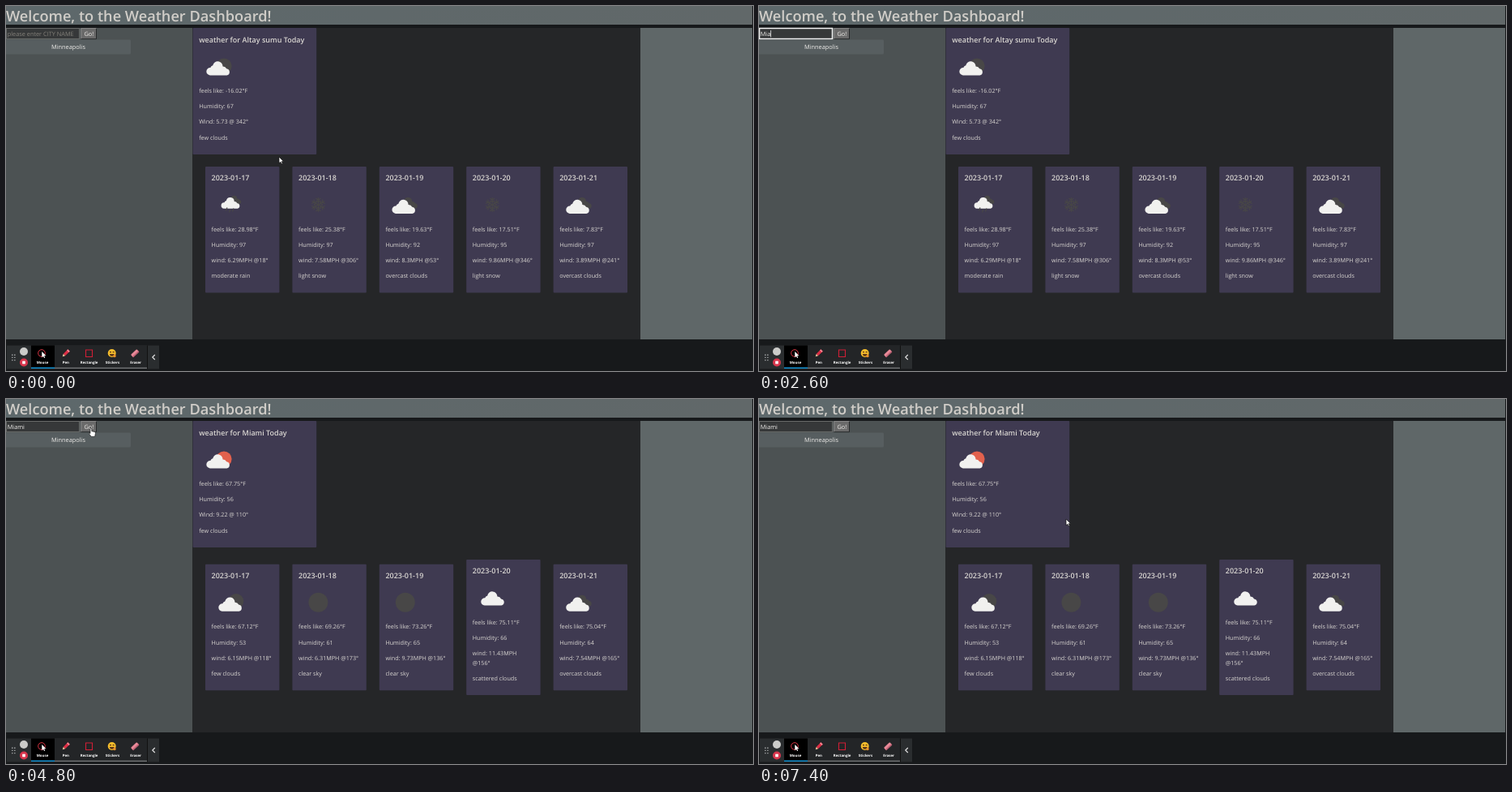
Write an HTML page that moves like this. It is 922 by 450 pixels and loops after 7.46 s.

```html
<!DOCTYPE html>
<html lang="en">
<head>
<meta charset="utf-8">
<title>Weather Dashboard</title>
<style>
html, body { margin: 0; width: 100%; height: 100%; overflow: hidden; background: #17191b; }
svg { display: block; width: 922px; height: 450px; }
text { font-family: "Open Sans", "Noto Sans", sans-serif; font-size: 7.2px; fill: #d8d5d1; text-rendering: geometricPrecision; }
.title { font-size: 18.2px; font-weight: 600; fill: #d0cdc8; }
.head { font-size: 9px; font-weight: 600; }
.form { font-size: 7.35px; fill: #efedea; }
.tool { font-size: 4.4px; font-weight: 700; fill: #fff; text-anchor: middle; }
.mid { text-anchor: middle; }
</style>
</head>
<body>
<svg viewBox="0 0 922 450">
  <defs>
    <linearGradient id="bar"><stop stop-color="#5d686b"/><stop offset="1" stop-color="#616869"/></linearGradient>
    <path id="cloud" d="M4.800 18.400A4.700 4.700 0 0 1 5.300 9A4.200 4.200 0 0 1 8.300 6.200A6.150 6.150 0 0 1 20.500 7.400A5 5 0 0 1 25.200 10.200A4.150 4.150 0 0 1 25.500 18.400Z"/>
  </defs>
  <path fill="url(#bar)" d="M0 0h921v23h-921z"/>
  <path fill="#4c5253" d="M0 27h230v384h-230z"/>
  <path fill="#252628" d="M230 27h553v384h-553z"/>
  <path fill="#5f6768" d="M783 27h138v384h-138z"/>
  <text class="title" x="0" y="19">Welcome, to the Weather Dashboard!</text>

  <rect id="field" x=".5" y="27.5" width="90" height="13" fill="#363839"/>
  <text id="entry" class="form" x="1.7" y="36.9"></text>
  <path id="caret" stroke="#fff" stroke-width=".7"/>
  <path fill="#6a6a6a" d="M92.5 27.5h19v13h-19z"/>
  <path fill="none" stroke="#858585" d="M92.7 40.5v-13h19"/>
  <path fill="none" stroke="#27292a" d="M92.5 40.7h19v-13"/>
  <text class="form mid" x="102.3" y="36.9">Go!</text>
  <rect x="-4" y="41.5" width="158" height="18" rx="1.5" fill="#575e60"/>
  <text class="form mid" x="77" y="53.2">Minneapolis</text>

  <g id="before"></g>
  <g id="after"></g>

  <g id="toolbar">
    <path fill="#2a2d2f" d="M1 418.500h188v29h-188z"/>
    <path fill="#232527" d="M60 418.500h114v28h-114z"/>
    <path fill="#000" d="M31 418.500h29v28h-29z"/>
    <path fill="#1593d2" d="M31 445.500h29v1.500h-29z"/>
    <path fill="#77797b" d="M60 445.700h114v1.200h-114z"/>
    <path stroke="#a5a7a8" stroke-width="1.400" stroke-dasharray="1.400 1.800" d="M7.800 429.500v8M10.800 429.500v8"/>
    <circle cx="22" cy="426" r="5" fill="#cbcbc9"/>
    <circle cx="22" cy="439.500" r="5" fill="#d8354c"/>
    <path fill="#fff" d="M20.200 437.700h3.600v3.600h-3.600z"/>
    <circle cx="44" cy="428" r="4.300" fill="none" stroke="#d93443"/>
    <path fill="#fff" d="M44.300 426v7.300l1.700-1.500 1.100 2.200 1.100-.5-1.100-2.200h2.300z"/>
    <g transform="translate(74 428) rotate(45)">
      <path fill="#dd2f45" d="M-1.700-5h3.400v8h-3.400z"/>
      <path fill="#f0c9a0" d="M-1.700 3h3.400L0 6z"/>
      <path fill="#f28a96" d="M-1.700-5h3.400v1.800h-3.400z"/>
    </g>
    <path fill="none" stroke="#d01f36" stroke-width="1.100" d="M98.500 424h8v8.500h-8z"/>
    <circle cx="130.700" cy="428" r="5" fill="#f5bd2c"/>
    <path fill="#5a3416" d="M128 426h2v1.200h-2zM131.600 426h2v1.200h-2zM128 429h5.600a2.800 2.800 0 0 1-5.600 0z"/>
    <circle cx="134" cy="431.500" r="1.700" fill="#e9902c"/>
    <g transform="translate(159 428) rotate(-43)">
      <rect x="-5" y="-2" width="10" height="4.500" rx="1" fill="#e88998"/>
      <path fill="#b95e70" d="M-5 1h10v1.500h-10z"/>
    </g>
    <path fill="none" stroke="#ddd" stroke-width="1.200" d="M183.800 430l-3 3 3 3"/>
    <path stroke="#111" d="M174.500 418.500v29"/>
  </g>

  <path id="arrow" fill="#fff" stroke="#111" stroke-width=".7" d="M0 0v7.800l1.800-1.600 1.200 2.600 1.400-.6-1.200-2.500h2.500z"/>
  <path id="hand" fill="#fff" stroke="#111" stroke-width=".6" d="M0-1.500q.9-1 1.800 0v3.200l3.700.8q1 .3.900 1.600l-.7 4.200h-4.500l-2.900-3.700q.1-1.300 1.700-.1z"/>
</svg>
<script>
const LOOP = 7460, DATA_AT = 4800, DARK = '#484747';
const $ = id => document.getElementById(id);
const text = (x, y, s, cls = '') => `<text x="${x}" y="${y}" class="${cls}">${s}</text>`;
const box = (x, y, w, h) => `<rect x="${x}" y="${y}" width="${w}" height="${h}" rx="1" fill="#3f3a51"/>`;
const cloud = (x, y, k = 1, c = '#f1f1ef') => `<use href="#cloud" transform="translate(${x} ${y}) scale(${k})" fill="${c}"/>`;
const disc = (x, y, r, c = DARK) => `<circle cx="${x}" cy="${y}" r="${r}" fill="${c}"/>`;

function snow(x, y) {
  let arms = '';
  for (let a = 0; a < 360; a += 60)
    arms += `<path transform="rotate(${a})" d="M0 0V-9M-3-8L0-5.500L3-8M-2.500-5L0-3L2.500-5"/>`;
  return `<g transform="translate(${x} ${y})" fill="none" stroke="${DARK}" stroke-width="1.100">${arms}</g>`;
}

// Each icon is placed relative to the corner of its card.
const icons = {
  rain: (x, y) => cloud(x + 27, y + 35, .6, DARK) + cloud(x + 19.3, y + 37, .8) +
    `<path stroke="${DARK}" stroke-width="1.200" d="M${x + 27} ${y + 50.5}l-1.500 4M${x + 31} ${y + 52.5}l-1.500 4M${x + 35} ${y + 51.5}l-1.500 4"/>`,
  snow: (x, y) => snow(x + 32, y + 47),
  overcast: (x, y) => cloud(x + 24, y + 37, .8, DARK) + cloud(x + 15.3, y + 39.5),
  few: (x, y) => disc(x + 38, y + 45.5, 9.3) + cloud(x + 16, y + 39.5),
  clear: (x, y) => disc(x + 32, y + 47, 12),
  scattered: (x, y) => cloud(x + 17.7, y + 38.2)
};

function today(city, sun, lines) {
  return box(230.5, 27, 152.7, 156) + text(238.2, 44.6, `weather for ${city} Today`, 'head') +
    disc(269, 74, 9.6, sun) + cloud(247, 67) +
    lines.map((s, i) => text(238.2, 107 + i * 19.2, s)).join('');
}

function day(i, top, [icon, feels, humidity, wind, sky]) {
  const x = 246 + i * 107.4, parts = wind.split('|'), extra = (parts.length - 1) * 11.5;
  return box(x, top, 91.4, 155.5 + extra) +
    text(x + 7.6, top + 17.2, '2023-01-' + (17 + i), 'head') +
    icons[icon](x, top) +
    text(x + 7.6, top + 79.6, `feels like: ${feels}°F`) +
    text(x + 7.6, top + 98.9, 'Humidity: ' + humidity) +
    parts.map((s, n) => text(x + 7.6, top + 118.1 + n * 11.5, s)).join('') +
    text(x + 7.6, top + 137.4 + extra, sky);
}

$('before').innerHTML = today('Altay sumu', DARK,
  ['feels like: -16.02°F', 'Humidity: 67', 'Wind: 5.73 @ 342°', 'few clouds']) + [
  ['rain', '28.98', 97, 'wind: 6.29MPH @18°', 'moderate rain'],
  ['snow', '25.38', 97, 'wind: 7.58MPH @306°', 'light snow'],
  ['overcast', '19.63', 92, 'wind: 8.3MPH @53°', 'overcast clouds'],
  ['snow', '17.51', 95, 'wind: 9.86MPH @346°', 'light snow'],
  ['overcast', '7.83', 97, 'wind: 3.89MPH @241°', 'overcast clouds']
].map((d, i) => day(i, 198, d)).join('');

$('after').innerHTML = today('Miami', '#e2614d',
  ['feels like: 67.75°F', 'Humidity: 56', 'Wind: 9.22 @ 110°', 'few clouds']) + [
  ['few', '67.12', 53, 'wind: 6.15MPH @118°', 'few clouds'],
  ['clear', '69.26', 61, 'wind: 6.31MPH @173°', 'clear sky'],
  ['clear', '73.26', 65, 'wind: 9.73MPH @136°', 'clear sky'],
  ['scattered', '75.11', 66, 'wind: 11.43MPH|@156°', 'scattered clouds'],
  ['overcast', '75.04', 64, 'wind: 7.54MPH @165°', 'overcast clouds']
].map((d, i) => day(i, i === 3 ? 198 : 203.8, d)).join('');

$('toolbar').innerHTML += ['Mouse', 'Pen', 'Rectangle', 'Stickers', 'Eraser']
  .map((s, i) => text(45 + i * 28.8, 441, s, 'tool')).join('');

// Pointer stops: time, x, y.
const path = [
  [0, 337, 186], [100, 337, 186], [900, 50, 34], [3300, 60, 36], [3900, 104, 38],
  [5450, 104, 38], [6300, 413.5, 269.5], [6600, 413.5, 269.5], [7300, 379, 148], [LOOP, 379, 148]
];
const keys = [2000, 2200, 2450, 2700, 2950];

function pointer(t) {
  const i = path.findIndex(p => p[0] > t), [t0, x0, y0] = path[i - 1], [t1, x1, y1] = path[i];
  const u = (t - t0) / (t1 - t0), e = u * u * (3 - 2 * u);
  return [x0 + (x1 - x0) * e, y0 + (y1 - y0) * e];
}

const show = (id, on) => $(id).style.display = on ? '' : 'none';

function draw(now) {
  const t = now % LOOP, [x, y] = pointer(t);
  const typed = 'Miami'.slice(0, keys.filter(k => k <= t).length);
  const focus = t > 1300 && t < 4100;
  const inField = x < 91 && y > 27 && y < 41;
  const onButton = x >= 92 && x < 112 && y > 27 && y < 41;

  show('before', t < DATA_AT);
  show('after', t >= DATA_AT);

  $('field').setAttribute('stroke', focus ? '#f4f4f4' : inField ? '#929492' : '#686a69');
  $('field').setAttribute('stroke-width', focus ? 1.5 : 1);
  $('entry').textContent = typed || 'please enter CITY NAME';
  $('entry').style.fill = typed ? '#efedea' : '#84817b';
  const edge = 2 + (typed ? $('entry').getComputedTextLength() : 0);
  $('caret').setAttribute('d', `M${edge} 30v8.5`);
  show('caret', focus && (t - 1300) % 1000 < 500);

  show('arrow', !inField && !onButton);
  show('hand', onButton);
  for (const id of ['arrow', 'hand']) $(id).setAttribute('transform', `translate(${x} ${y})`);
  requestAnimationFrame(draw);
}
requestAnimationFrame(draw);
</script>
</body>
</html>
```
